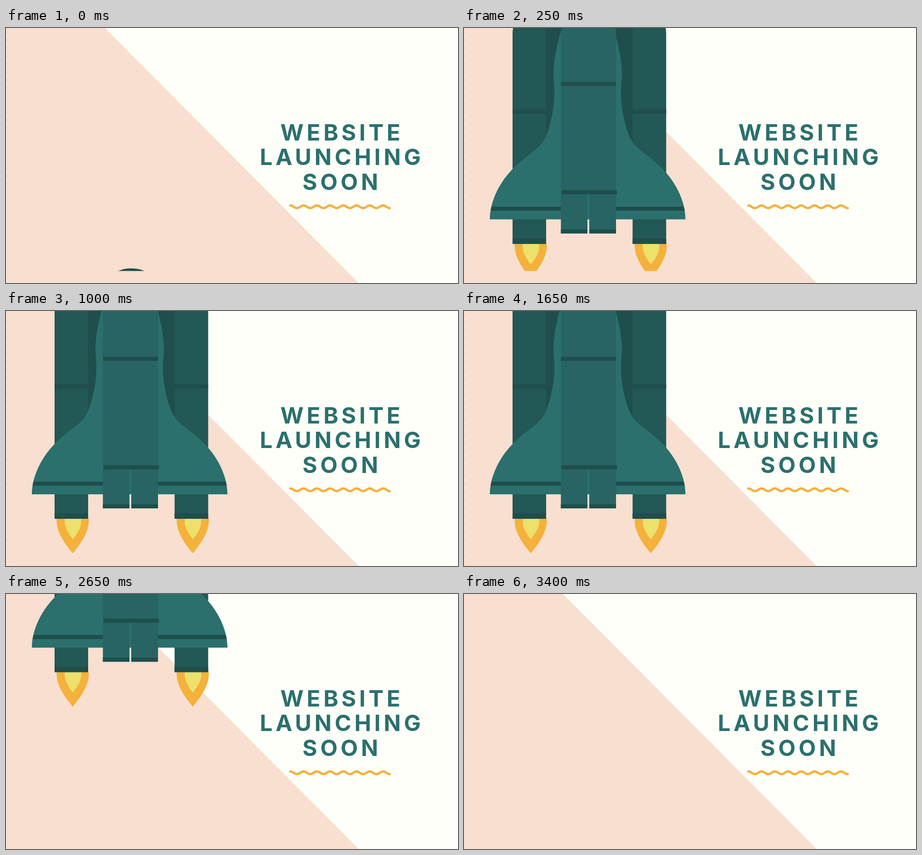
These frames come from a looping animation (996 px wide and 562 px high, 3450 ms). An HTML page:

```html
<!DOCTYPE html>
<html lang="en">
<head>
<meta charset="utf-8">
<title>Website launching soon</title>
<style>
  html, body { margin: 0; width: 100%; height: 100%; overflow: hidden; background: #fefff8; }
  svg { display: block; width: 996px; height: 562px; }
  text { font: 700 49.5px Inter, sans-serif; letter-spacing: 6.8px; text-anchor: middle; fill: #2b706d; }
  .body { fill: #2b706d; }
  .panel { fill: #276463; }
  .booster { fill: #225855; }
  .dark { fill: #1f4e4c; }
</style>
</head>
<body>
<svg viewBox="0 0 996 562">
  <defs>
    <clipPath id="window"><path d="M0 0H996V535.5H0Z"/></clipPath>
    <g id="booster">
      <path fill="#f4b13b" d="M112 456C108 486 133 517 147 534C161 517 186 486 182 456Z"/>
      <path fill="#eee06c" d="M130 456C126 474 138 491 147 503C157 491 169 474 165 456Z"/>
      <path class="booster" d="M107 458V-6C108 -38 126 -66 133 -78L144 -98L157 -78C164 -66 180 -38 181 -6V458Z"/>
      <path class="dark" d="M107 162H181V171H107ZM107 446H181V458H107Z"/>
    </g>
    <g id="half">
      <path class="body" d="M274 -118C254 -118 243 -95 237 -78C224 -46 197 28 197 85C198 105 200 120 199 137C196 175 188 203 180 222C168 250 143 257 108 292C74 327 57 369 57 404H274Z"/>
      <path class="dark" d="M60.500 376H220V385H58.500Z"/>
    </g>
  </defs>

  <path fill="#f8dfd0" d="M0 0H218L777 562H0Z"/>
  <path id="ticks" stroke="#fdf3ea" stroke-width="1.200"/>

  <g clip-path="url(#window)">
    <g id="rocket">
      <path class="dark" d="M180 300V-25C182 -70 205 -160 276 -160S371 -70 373 -25V300Z"/>
      <use href="#booster"/>
      <use href="#booster" x="264.500"/>
      <use href="#half"/>
      <use href="#half" transform="translate(545) scale(-1 1)"/>
      <path class="panel" d="M213.500 435V-12C222 -40 231 -60 237 -78C243 -95 254 -118 272.500 -118S302 -95 308 -78C314 -60 326 -40 335 -12V435H276V349H272V435Z"/>
      <path class="dark" d="M213.500 101H335V110H213.500ZM215 340H337V349H215ZM213.500 426H272V435H213.500ZM276 426H335V435H276Z"/>
      <path class="dark" d="M246 -43L255 -50L260 -42L249 -39ZM260 -51Q273 -54 285 -51L281 -44H265ZM300 -43L290 -50L285 -42L297 -39Z"/>
    </g>
  </g>

  <text x="740" y="248">WEBSITE</text>
  <text x="740" y="302">LAUNCHING</text>
  <text x="740" y="356.500">SOON</text>
  <path id="wave" fill="none" stroke="#f4b13b" stroke-width="5.200" stroke-linecap="round"/>
</svg>
<script>
  const LOOP = 3450, RISE = 474, TRAVEL = 700, LEAVE = 2500;
  const $ = id => document.getElementById(id);

  $('ticks').setAttribute('d',
    Array.from({ length: 31 }, (_, i) => `M0 ${((i + 1) * 17.7).toFixed(1)}h6`).join(''));

  let wave = 'M626.5 391';
  for (let i = 0; i < 15; i++) {
    const dy = i % 2 ? -6 : 6;
    wave += `c6.2 0 8.400 ${dy} 14.6 ${dy}`;
  }
  $('wave').setAttribute('d', wave);

  // Exponential ease-out on arrival, cubic ease-in on departure.
  function offset(t) {
    if (t < 600) return TRAVEL * 2 ** (-10 * t / RISE);
    if (t < LEAVE) return 0;
    return Math.max(-TRAVEL, -280 * ((t - LEAVE) / 150) ** 3);
  }

  function draw() {
    const t = performance.now() % LOOP;
    $('rocket').setAttribute('transform', `translate(0 ${offset(t).toFixed(2)})`);
    requestAnimationFrame(draw);
  }
  draw();
</script>
</body>
</html>
```
